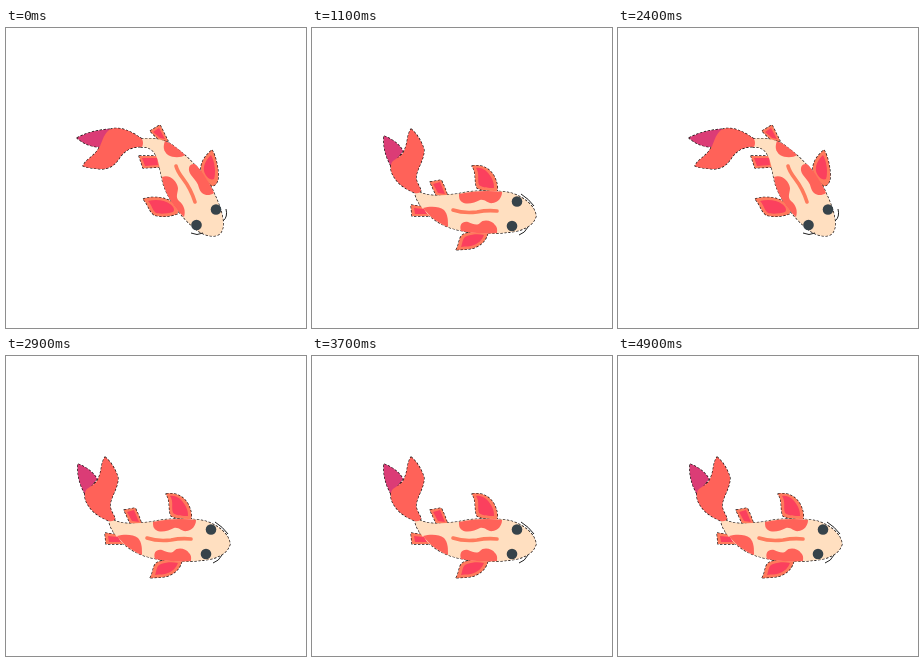
An HTML page that plays this animation: 300 by 300 pixels, repeating every 5 s.

```html
<!DOCTYPE html>
<html lang="en">
<head>
<meta charset="utf-8">
<title>Koi</title>
<style>
  html, body { margin: 0; width: 100%; height: 100%; overflow: hidden; background: #fff; }
  svg { display: block; width: 100vw; height: 100vh; }
  path { stroke-linejoin: round; }
  .outline { stroke: #1c1514; stroke-width: 1.3; stroke-dasharray: 2.5 1.5; }
  .lobe { fill: #db3c76; }
  .tail, .patch { fill: #ff6259; }
  .body { fill: #ffdfc0; }
  .fin { fill: #ff7a5c; }
  .web { fill: #fb405e; }
  .stripe { fill: none; stroke: #ff7a5c; stroke-width: 3.6; stroke-linecap: round; }
  .eye { fill: #37434a; }
  .whisker { fill: none; stroke: #222; stroke-width: 1; }
</style>
</head>
<body>
<svg viewBox="0 0 300 300">
  <g id="down">
    <!-- Dashed strokes lie under the fills, so only the silhouette's rim shows. -->
    <use class="outline" href="#down-shape"/>
    <g id="down-shape">
      <path class="lobe" d="M71 110C80 105 91 102 105 101L94 119C86 119 78 116 71 110Z"/>
      <path class="fin" d="M144 103L154 97L162 113L153 112Z"/>
      <path class="fin" d="M133 128L153 128L155 139L137 140Z"/>
      <path class="fin" d="M206 122C210 128 213 143 212 151C211 156 208 158 206 158C201 154 196 149 195 143C194 134 200 127 206 122Z"/>
      <path class="fin" d="M137 171C147 168 159 169 166 174C171 178 174 182 171 186C163 189 153 189 148 187C143 183 142 176 137 171Z"/>
      <path class="body" d="M135 111C147 110 159 110 171 121C186 132 201 149 208 165C212 174 216 183 217 193C218 203 214 208 207 208C200 208 192 204 185 197C174 187 162 171 157 155C154 143 153 130 147 123C143 119 139 119 135 119Z"/>
      <path class="tail" d="M136 111C126 104 113 97 103 102C97 107 96 115 93 120C88 129 80 131 77 138C82 140 88 140 95 141C104 141 110 136 114 129C119 122 127 118 136 119Q138 115 136 111Z"/>
    </g>
    <path class="web" d="M147 104L153 100L159 111L154 110Z"/>
    <path class="web" d="M136 130L151 130L152 137L139 138Z"/>
    <path class="web" d="M205 127C209 134 210 145 208 151C204 153 199 148 198 143C197 136 201 131 205 127Z"/>
    <path class="web" d="M142 173C150 171 159 172 164 176C168 179 169 182 167 184C161 186 153 186 150 185C146 182 146 177 142 173Z"/>
    <path class="patch" d="M159 113C166 116 173 121 179 127C175 130 167 130 162 127C157 123 157 118 159 113Z"/>
    <path class="patch" d="M189 136C196 143 204 155 208 165C202 169 195 167 193 160C192 155 189 152 185 147C181 141 183 135 189 136Z"/>
    <path class="patch" d="M156 149C164 146 171 153 172 160C172 165 169 169 173 173C178 177 180 183 178 189C169 181 160 167 157 155Z"/>
    <path class="stripe" d="M170 138C173 150 182 151 189 174"/>
    <circle class="eye" cx="210" cy="181.500" r="5.300"/>
    <circle class="eye" cx="190.500" cy="197" r="5.300"/>
    <path class="whisker" d="M217 193Q222 189 220 181M197 205Q191 208 185 205"/>
  </g>
  <g id="right">
    <use class="outline" href="#right-shape"/>
    <g id="right-shape">
      <path class="lobe" d="M72 108C80 111 87 116 91 123L79 138C74 129 71 119 72 108Z"/>
      <path class="fin" d="M118 154L129 152C132 157 134 163 136 169L124 167Z"/>
      <path class="fin" d="M99 177L114 179L119 188L100 188Z"/>
      <path class="fin" d="M160 138C170 136 178 141 182 148C185 154 186 159 185 163C178 163 170 163 165 160C162 153 165 145 160 138Z"/>
      <path class="fin" d="M144 222C148 216 146 209 152 206C159 203 168 203 176 204C175 210 171 216 164 219C158 222 151 221 144 222Z"/>
      <path class="body" d="M104 162C113 169 127 168 145 166C163 162 184 162 199 165C212 169 223 178 224 188C222 197 211 203 198 204C179 207 152 205 136 199C119 192 107 180 103 166Z"/>
      <path class="tail" d="M99 101C105 106 110 114 112 122C112 132 105 140 104 149C104 155 108 158 109 163Q107 166 103 165C99 163 91 160 85 153C80 147 77 140 80 134C84 130 91 128 93 121C96 114 95 107 99 101Z"/>
    </g>
    <path class="web" d="M121 156L128 154L133 166L126 165Z"/>
    <path class="web" d="M102 180L112 181L115 186L103 186Z"/>
    <path class="web" d="M164 140C171 139 176 144 179 149C182 154 182 157 182 160C177 160 171 160 167 157C165 151 168 146 164 140Z"/>
    <path class="web" d="M149 219C151 214 150 210 155 208C161 206 167 206 172 207C170 212 167 215 162 217C158 219 154 218 149 219Z"/>
    <path class="patch" d="M147 166C161 163 177 162 190 164C190 170 186 174 181 175C175 176 174 171 168 172C163 175 154 177 150 174C147 172 147 169 147 166Z"/>
    <path class="patch" d="M149 203C147 197 150 193 156 194C161 196 165 198 168 195C171 191 180 192 183 197C186 200 185 203 185 205C173 206 160 205 149 203Z"/>
    <path class="patch" d="M111 180C118 178 127 178 132 182C136 186 136 193 136 199C126 195 118 189 111 180Z"/>
    <path class="stripe" d="M141 182C150 185 157 185 165 184Q175 182 185 183"/>
    <circle class="eye" cx="205" cy="173.500" r="5.300"/>
    <circle class="eye" cx="200" cy="198" r="5.300"/>
    <path class="whisker" d="M209 166Q217 171 222 178M216 199Q213 205 207 207"/>
  </g>
</svg>
<script>
  const LOOP = 5000, BEAT = 100;
  const down = document.getElementById("down");
  const right = document.getElementById("right");

  // The fish flips on every beat, resting once in each pose.
  function facesRight(time) {
    if (time >= 500 && time < 1000) return true;
    if (time >= 4000 && time < 4500) return false;
    return Math.floor(time / BEAT) % 2 === 1;
  }

  function draw() {
    const turned = facesRight(performance.now() % LOOP);
    down.style.display = turned ? "none" : "";
    right.style.display = turned ? "" : "none";
    requestAnimationFrame(draw);
  }
  draw();
</script>
</body>
</html>
```
